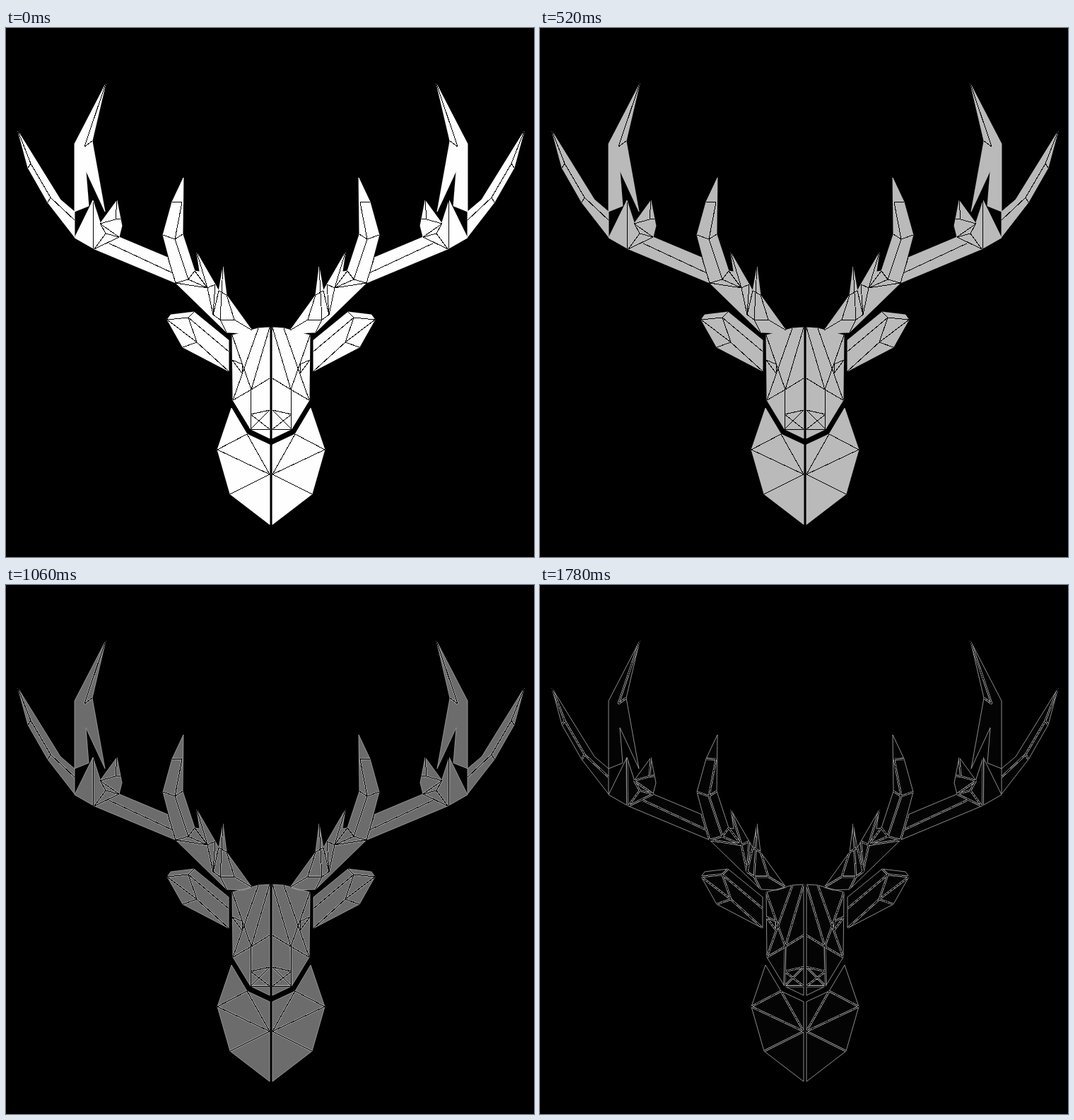
An HTML page for the animation above (1810 ms loop, 747 by 749 pixels).

```html
<!DOCTYPE html>
<html lang="en">
<head>
<meta charset="utf-8">
<title>Faceted stag</title>
<style>
html, body { margin: 0; width: 100%; height: 100%; overflow: hidden; background: #000; }
svg { display: block; }
path { stroke-linejoin: bevel; }
</style>
</head>
<body>
<svg width="747" height="749" viewBox="0 0 747 749">
  <defs>
    <clipPath id="inside"><path id="mask"/></clipPath>
    <g id="half">
      <path id="body" shape-rendering="crispEdges"/>
      <path id="rim" fill="none" stroke-width=".9"/>
      <g clip-path="url(#inside)"><path id="glow" fill="none" stroke-width="2.8"/></g>
      <path id="seam" fill="none" stroke="#000" shape-rendering="crispEdges"/>
    </g>
  </defs>
  <use href="#half"/>
  <use href="#half" transform="matrix(-1 0 0 1 750 0)"/>
</svg>
<script>
const el = id => document.getElementById(id);
const path = pts => 'M' + pts.join('L');
let outline = '', creases = '';

// Corners are named a, b, c... in order: the rim first, then inner points.
// Each word in folds is a crease running through the named corners.
function part(rim, inner, folds) {
  const edge = rim.split(' ');
  const pts = edge.concat(inner.split(' '));
  outline += path(edge) + 'Z';
  for (const word of folds.split(' ')) {
    creases += path([...word].map(c => pts[c.charCodeAt(0) - 97]));
  }
}

// Left half of the head; the right half is its mirror image.
// Outer tine
part('17,146 77,243 97,260 97,296 59,247 31,198', '35,192 63,240 97,272', 'aghi gf he');
// Upper tine
part('141,79 97,164 97,260 117,252 113,202 140,260 122,160', '111,168', 'ahg');
// Knuckle
part('123,244 97,297 125,313 141,291 134,278', '123.5,313', 'af cde');
// Small spike
part('157,244 133,277 141,291 160,296 164,280 162,270', '155,271', 'ag bgf bd cd');
// Main beam
part('125,313 141,291 160,296 229,325 240,361', '146,305 236,347', 'ac fg de');
// Middle tine
part('251,212 235,246 222,293 240,361 258,356 267,344 250,292', '249,247 239,299', 'bh cig ih ie def');
// Lower beam with two spikes
part('240,361 258,356 267,344 274,345 270,318 296,363 301,372 307,338 312,378 348,428 336,432 312,431',
  '285,368 303,413 323,413 293,406', 'amf bmc em mp fp gi gp hn pnoj io nl');
// Ear
part('228,413 233,406 266,402 315,442 315,486 250,452', '258,410 315,458 270,445', 'agc gh aie gif');
// Face
part('320,435 357,425 373,424 373,581 346,568 321,527', '347,512 373,496 320,470 334,476 334,489 346,547 373,541 373,568',
  'fgh cgen ag bf ijki lm em ln');
// Neck
part('319,538 341,575 373,590 373,703 317,660 299,597', '373,632', 'fbg fge');

for (const id of ['mask', 'body', 'rim']) el(id).setAttribute('d', outline);
for (const id of ['glow', 'seam']) el(id).setAttribute('d', creases);

const LOOP = 1810, END = 1780, STEP = 120, EDGE = 155;
const gray = v => `rgb(${v},${v},${v})`;

function draw(ms) {
  const t = ms % LOOP;
  // The beat of the steps shifts once, halfway through the fade.
  const base = t < 940 ? 160 : 940;
  const at = base + STEP * Math.floor((t - base) / STEP);
  const tone = Math.round(Math.min(254, 4 + (END - at) * 0.1443));
  const light = gray(Math.max(tone, EDGE));
  el('body').setAttribute('fill', gray(tone));
  el('rim').setAttribute('stroke', light);
  el('glow').setAttribute('stroke', light);
}

let start = null;
function tick(now) {
  start ??= now;
  draw(now - start);
  requestAnimationFrame(tick);
}
draw(0);
requestAnimationFrame(tick);
</script>
</body>
</html>
```
